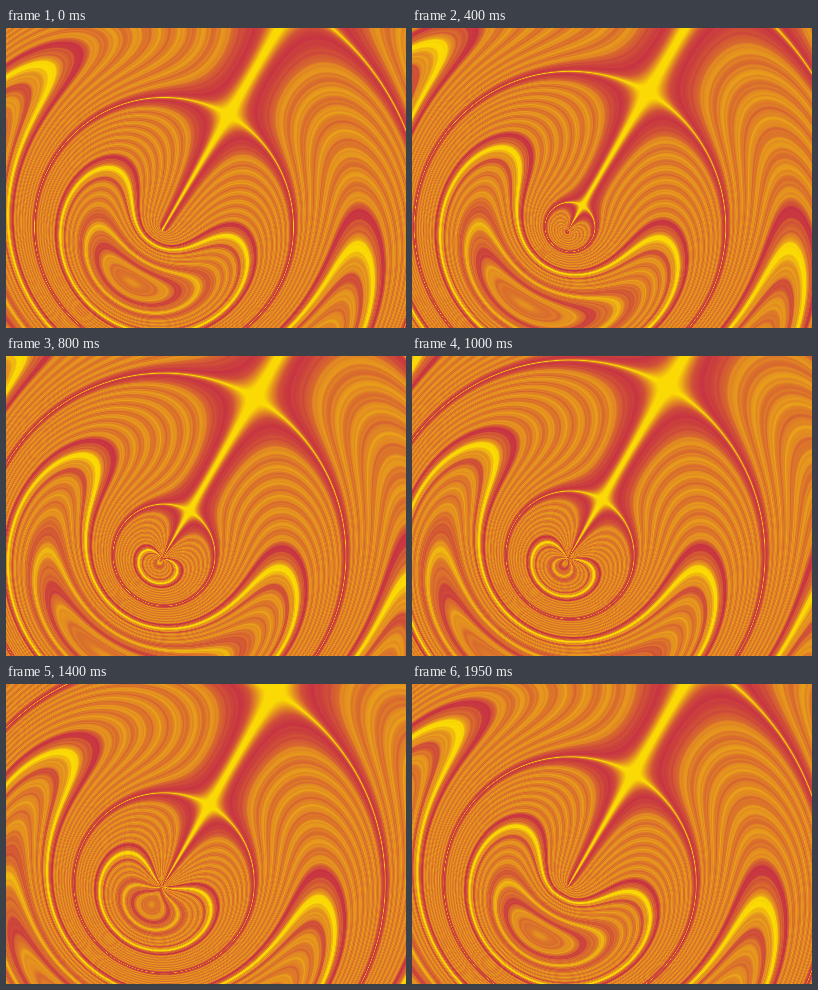
An HTML page with a canvas for the animation above (2000 ms loop, 400 by 300 pixels).

```html
<!DOCTYPE html>
<html lang="en">
<head>
<meta charset="utf-8">
<title>Marbled waves</title>
<style>
html, body { margin: 0; width: 100%; height: 100%; overflow: hidden; background: #dc8622; }
canvas { display: block; width: 400px; height: 300px; }
</style>
</head>
<body>
<canvas id="stage" width="400" height="300"></canvas>
<script>
const W = 400, H = 300, LOOP = 2000, STEP = 50;
const POLE = { x: 155.5, y: 202 }, RAY = -Math.PI / 3;
const WAVE = 131, LEAN = 4, INSET = 1.5, SOFT = .1;
const RED = [199, 51, 66], YELLOW = [250, 217, 4];

const mix = (a, b, k) => a + (b - a) * k;
const bump = (x, mid, width) => Math.exp(-(((x - mid) / width) ** 2));

// Brightness across the bands: even ripples with a few dark and bright stripes.
function bandAt(x) {
  const ripples = .12 * Math.cos(x * 118) + .05 * Math.sin(x * 410) + .03 * Math.sin(x * 673);
  const dark = bump(x, .048, .032) + bump(x, .47, .026) + .7 * bump(x, .598, .012)
    + .8 * bump(x, .8, .016) + .8 * bump(x, .915, .022);
  const bright = 1.4 * bump(x, 0, .016) + bump(x, .54, .026) + .4 * bump(x, .845, .02);
  const calm = Math.min(1, x / .12);
  return .48 + ripples * calm + .48 * (bright - dark);
}

// The swing away from the ray starts flat and then grows evenly.
const swingOf = s => s * s * (1 + SOFT) / (s + SOFT);
const swingInverse = q => (q + Math.sqrt(q * q + 4 * (1 + SOFT) * SOFT * q)) / (2 * (1 + SOFT));

const SHADES = 16384;
const palette = new Uint32Array(SHADES + 1);
for (let i = 0; i <= SHADES; i++) {
  const v = Math.max(0, Math.min(1, bandAt(swingInverse(i / SHADES))));
  const [r, g, b] = RED.map((c, j) => Math.round(mix(c, YELLOW[j], v)));
  palette[i] = (255 << 24 | b << 16 | g << 8 | r) >>> 0;
}

// Each pixel's level is a sine of the radius times its swing from the ray.
const sinR = new Float32Array(W * H), cosR = new Float32Array(W * H);
for (let y = 0, i = 0; y < H; y++) {
  for (let x = 0; x < W; x++, i++) {
    const dx = x - POLE.x, dy = y - POLE.y;
    const angle = Math.atan2(dy, dx) - RAY;
    const swing = swingOf(Math.abs(Math.sin(angle / 2))) * SHADES;
    const phase = Math.PI * (Math.hypot(dx, dy) + INSET - LEAN * Math.cos(angle)) / WAVE;
    sinR[i] = swing * Math.sin(phase);
    cosR[i] = swing * Math.cos(phase);
  }
}

const ctx = document.getElementById("stage").getContext("2d");
const image = ctx.createImageData(W, H);
const pixels = new Uint32Array(image.data.buffer);
let shown = -1;

function draw(step) {
  const turn = Math.PI * step * STEP / LOOP;
  const c = Math.cos(turn), s = Math.sin(turn);
  for (let i = 0; i < pixels.length; i++) {
    pixels[i] = palette[Math.min(SHADES, Math.abs(sinR[i] * c - cosR[i] * s) | 0)];
  }
  ctx.putImageData(image, 0, 0);
}

const start = performance.now();
function tick() {
  const time = Math.max(0, performance.now() - start) % LOOP;
  const step = Math.floor(time / STEP);
  if (step !== shown) draw(shown = step);
  requestAnimationFrame(tick);
}
tick();
</script>
</body>
</html>
```
